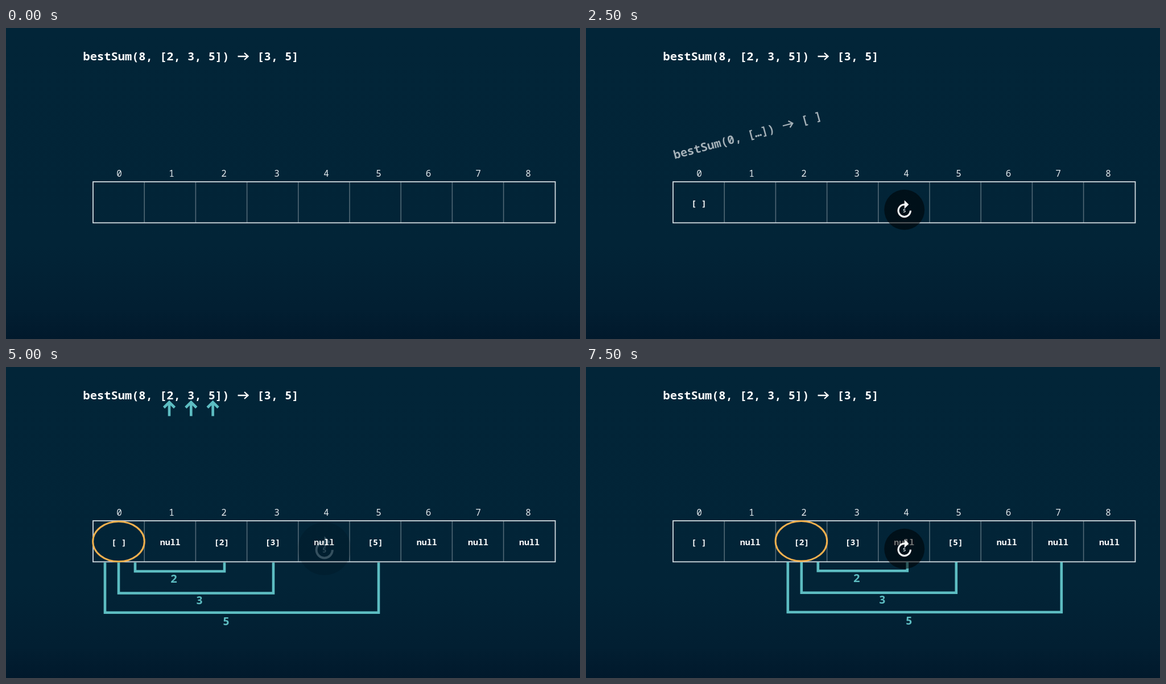
These frames come from a looping animation (1009 px wide and 548 px high, 8 s). An HTML page:

```html
<!DOCTYPE html>
<html lang="en">
<head>
<meta charset="utf-8">
<title>bestSum table</title>
<style>
  html, body { margin: 0; width: 100%; height: 100%; overflow: hidden; background: #022538; }
  svg { display: block; width: 1009px; height: 548px; }
  text { font: 700 15px "Noto Sans Mono", "DejaVu Sans Mono", monospace; fill: #fff; white-space: pre; }
  .code { font-size: 20.4px; }
  .mid { text-anchor: middle; }
  .index { font-size: 16px; font-weight: 400; fill: #e4e9ec; }
  .tilt { opacity: .64; }
  .tilt text { font-weight: 600; }
  .line { fill: none; stroke: #fff; stroke-width: 2.3; }
  .teal { fill: none; stroke: #5dbdc2; stroke-width: 4.6; }
  .label { font-size: 20px; fill: #5dbdc2; }
</style>
</head>
<body>
<svg viewBox="0 0 1009 548">
  <defs>
    <linearGradient id="bg" x1="0" y1="0" x2="0" y2="1">
      <stop offset="0" stop-color="#022538"/>
      <stop offset=".7" stop-color="#022437"/>
      <stop offset=".9" stop-color="#021f32"/>
      <stop offset="1" stop-color="#01192c"/>
    </linearGradient>
  </defs>
  <rect width="1009" height="548" fill="url(#bg)"/>
  <g id="table"></g>
  <g id="scene"></g>
</svg>
<script>
const STEP = 500, STEPS = 16, CELL = 90.2, ADVANCE = 12.24;
const cellX = i => 198.5 + CELL * i;
const text = (cls, x, y, s) => `<text class="${cls}" x="${x}" y="${y}">${s}</text>`;
const path = (cls, d) => `<path class="${cls}" d="${d}"/>`;

// Thin arrow centred on a character boundary of a code line
const codeArrow = (x, y, column) =>
  path("line", `M${x + column * ADVANCE - 9.5} ${y}h18m-6.5 -6l6.5 6l-6.5 6`);

function drawTable() {
  const indexX = [199, 291, 383, 476, 563, 655, 742.5, 830, 918];
  let out = text("code", 135.5, 57, "bestSum(8, [2, 3, 5])    [3, 5]") + codeArrow(135.5, 50, 23);
  for (let i = 1; i < 9; i++)
    out += `<path d="M${153 + CELL * i} 271v72" stroke="#526976" stroke-width="1.6"/>`;
  out += '<rect x="153" y="271" width="812.5" height="72.3" fill="none" stroke="#d3dadf" stroke-width="1.8"/>';
  return out + indexX.map((x, i) => text("index mid", x, 261.8, i)).join("");
}

function tilted(withResult) {
  const call = "bestSum(0, […])";
  return '<g class="tilt" transform="translate(156 231) rotate(-15.1)">' +
    text("code", 0, 0, withResult ? call + "    [ ]" : call) +
    (withResult ? codeArrow(0, -7, 17) : "") + "</g>";
}

const cells = values => values.map((v, i) => text("mid", cellX(i), 314, v)).join("");

const ring = i =>
  `<ellipse cx="${198 + CELL * i}" cy="${307.5 - i * .4}" rx="45.3" ry="35.3" fill="none" stroke="#f2b04e" stroke-width="3"/>`;

const pointers = n => [287, 325.3, 363.6].slice(0, n)
  .map(x => path("teal", `M${x} 86.5V62m-9.5 9.5l9.5 -9.5l9.5 9.5`)).join("");

function brackets(n, from) {
  const shapes = [
    [2, 227, 360, 384, 295, 380],
    [3, 198, 398.5, 470, 340, 417.5],
    [5, 174, 432.8, 655, 387, 455]
  ];
  return `<g transform="translate(${from * 90.4} ${-from * .4})">` +
    shapes.slice(0, n).map(([size, left, bottom, right, lx, ly]) =>
      path("teal", `M${left} 344.5V${bottom}H${right}V344.5`) + text("label mid", lx, ly, size)
    ).join("") + "</g>";
}

// Player's skip-forward badge
function badge(radius, opacity) {
  return `<g opacity="${opacity}" transform="translate(559.7 320.3) scale(${radius / 33.5})">
    <circle r="33.5" opacity=".56"/>
    <path transform="scale(1.45) translate(-12 -12)" fill="#fff"
      d="M18 13a6 6 0 1 1-6-6v4l5-5-5-5v4a8 8 0 1 0 8 8z"/>
    <text class="mid" y="4.8" style="font-size:9px;opacity:.85">5</text></g>`;
}

const badges = {
  2: [48, .2], 3: [33.5, 1], 5: [35.5, .96], 8: [34.5, 1],
  10: [46.5, .2], 11: [35, .96], 15: [35.5, .96]
};

function drawScene(k) {
  const values = Array(9).fill(k < 6 ? "" : "null");
  if (k >= 4) values[0] = "[ ]";
  if (k >= 8) values[2] = "[ ]";
  if (k >= 10) for (const n of [2, 3, 5]) values[n] = `[${n}]`;

  let out = cells(values);
  if (k >= 2 && k < 6) out += tilted(k >= 4);
  if (k >= 7) {
    const current = Math.max(0, Math.min(2, k - 12));
    const count = k < 10 ? 1 : 3;
    if (current !== 1) out += brackets(count, current);
    if (current === 0) out += pointers(count);
    out += ring(current);
  }
  return out + (badges[k] ? badge(...badges[k]) : "");
}

const scene = document.getElementById("scene");
document.getElementById("table").innerHTML = drawTable();
let shown = -1;
function tick() {
  const k = Math.floor(performance.now() / STEP) % STEPS;
  if (k !== shown) scene.innerHTML = drawScene(shown = k);
  requestAnimationFrame(tick);
}
tick();
</script>
</body>
</html>
```
